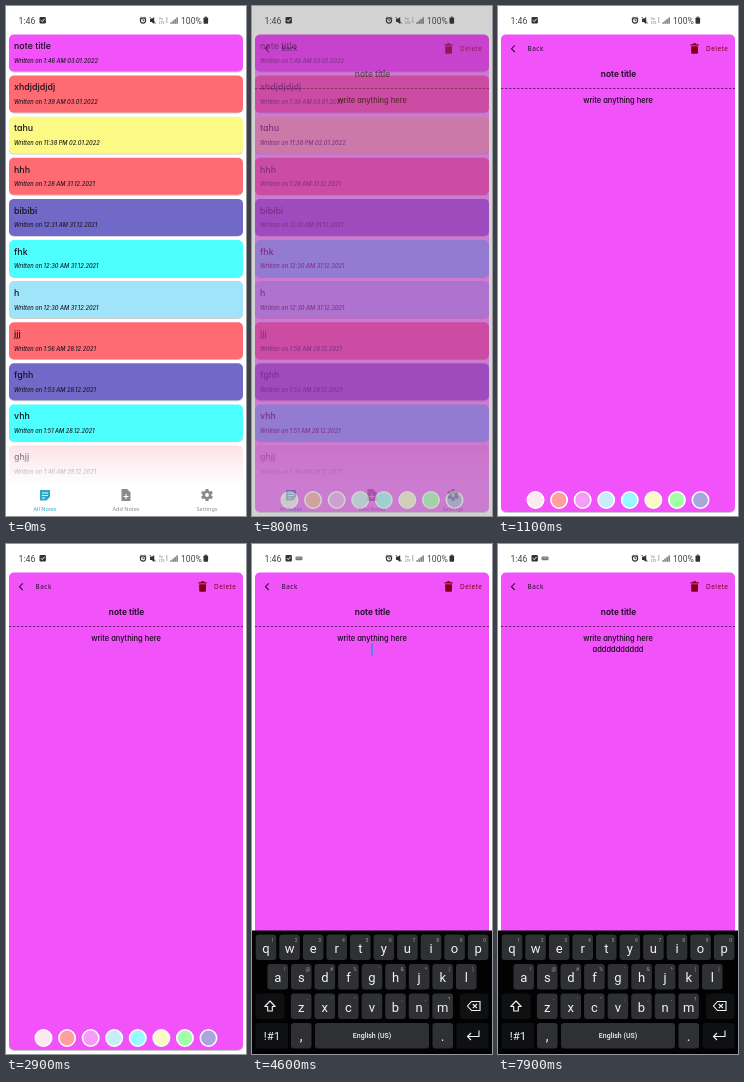
Write an HTML page that moves like this. It is 240x510 px and loops after 8 s.

```html
<!DOCTYPE html>
<html lang="en">
<head>
<meta charset="utf-8">
<title>Notes app</title>
<style>
  html, body { margin: 0; width: 100%; height: 100%; overflow: hidden; background: #fff; }
  svg { display: block; width: 240px; height: 510px; }
  text { font-family: Inter, "Open Sans", sans-serif; font-feature-settings: "cv11"; white-space: pre; }
  .ui { font-family: Roboto, sans-serif; font-feature-settings: normal; }
  .label { font-family: "Noto Sans", "Open Sans", sans-serif; font-feature-settings: normal; }
  .mid { text-anchor: middle; }
</style>
</head>
<body>
<svg id="stage" viewBox="0 0 240 510">
  <defs>
    <linearGradient id="fade" x1="0" y1="0" x2="0" y2="1">
      <stop offset="0" stop-color="#fff" stop-opacity="0"/>
      <stop offset=".2" stop-color="#fff" stop-opacity=".35"/>
      <stop offset="1" stop-color="#fff" stop-opacity=".95"/>
    </linearGradient>
  </defs>
  <g id="list"></g>
  <rect id="scrim" width="240" height="510"/>
  <g id="note"></g>
  <g id="status"></g>
  <g id="keyboard"></g>
</svg>
<script>
const LOOP = 8000;
const MAGENTA = '#f152fa', RED = '#ff6b72', PURPLE = '#7169c8', CYAN = '#4dffff';
const $ = id => document.getElementById(id);

function add(parent, tag, attrs, content) {
  const node = document.createElementNS('http://www.w3.org/2000/svg', tag);
  for (const key in attrs) node.setAttribute(key, attrs[key]);
  if (content !== undefined) node.textContent = content;
  parent.appendChild(node);
  return node;
}
const box = (g, x, y, width, height, fill, rx = 0) =>
  add(g, 'rect', { x, y, width, height, fill, rx });
const write = (g, x, y, size, content, attrs = {}) =>
  add(g, 'text', { x, y, 'font-size': size, ...attrs }, content);
const line = (g, d, stroke, width = 1, attrs = {}) =>
  add(g, 'path', { d, stroke, fill: 'none', 'stroke-width': width, ...attrs });
const fill = (g, d, color) => add(g, 'path', { d, fill: color });
const dot = (g, cx, cy, r, color, attrs = {}) =>
  add(g, 'circle', { cx, cy, r, fill: color, ...attrs });

function drawList(g) {
  const rows = [
    ['note title', '1:46 AM 03.01.2022', MAGENTA],
    ['xhdjdjdjdj', '1:39 AM 03.01.2022', RED],
    ['tahu', '11:38 PM 02.01.2022', '#fdf985'],
    ['hhh', '1:28 AM 31.12.2021', RED],
    ['bibibi', '12:31 AM 31.12.2021', PURPLE],
    ['fhk', '12:30 AM 31.12.2021', CYAN],
    ['h', '12:30 AM 31.12.2021', '#a0e4f9'],
    ['jjj', '1:56 AM 28.12.2021', RED],
    ['fghh', '1:53 AM 28.12.2021', PURPLE],
    ['vhh', '1:51 AM 28.12.2021', CYAN],
    ['ghjj', '1:46 AM 28.12.2021', '#fbd9e2']
  ];
  box(g, 0, 0, 240, 510, '#fff');
  rows.forEach(([title, date, color], i) => {
    const y = 28.5 + i * 41.1;
    box(g, 3, y + 0.9, 234, 37, '#0003', 5);
    box(g, 3, y, 234, 37, color, 5);
    write(g, 8, y + 14.7, 8.9, title, { 'font-weight': 500, fill: '#15121a' });
    write(g, 8, y + 28.4, 5.7, 'Written on ' + date,
      { 'font-weight': 500, 'font-style': 'italic', fill: '#1a1620' });
  });
  add(g, 'rect', { x: 0, y: 436, width: 240, height: 41, fill: 'url(#fade)' });
  box(g, 0, 477, 240, 33, '#fff');

  const blue = '#2ba6c9', grey = '#8a8a8a';
  fill(g, 'M34 484h10v7l-3.5 3.5H34z', blue);
  line(g, 'M36 487h6M36 489.5h6M36 492h3', '#fff', 0.9);
  fill(g, 'M115.500 483h5.500l3.500 3.500v8.500h-9z', grey);
  line(g, 'M117.500 490.500h5M120 488v5', '#fff', 1.1);
  dot(g, 201, 489, 3.2, 'none', { stroke: grey, 'stroke-width': 2.6 });
  for (let a = 0; a < 360; a += 60)
    add(g, 'rect', { x: 199.5, y: 483, width: 3, height: 2.4, fill: grey, transform: `rotate(${a} 201 489)` });
  [['All Notes', 39, blue], ['Add Notes', 120, grey], ['Settings', 201, grey]].forEach(([name, x, color]) =>
    write(g, x, 505, 5.5, name, { class: 'label mid', fill: color }));
}

function drawNote(g) {
  box(g, 0, 0, 240, 510, '#fff');
  box(g, 3, 29, 234, 478, '#0003', 5);
  box(g, 3, 28.5, 234, 477.5, MAGENTA, 5);
  line(g, 'M16.800 39.300L13.500 42.700l3.300 3.400', '#2a1030', 1.1);
  write(g, 29.5, 45, 6.4, 'Back', { class: 'label', fill: '#2a1030', 'letter-spacing': 0.55 });
  fill(g, 'M192.500 38.200h2.200l.7-.9h2.400l.7.900h2.200v1.400h-8.200z M193.200 40.200h6.800v6.400q0 1.200-1.200 1.200h-4.400q-1.200 0-1.200-1.200z', '#7d0012');
  write(g, 208, 45, 6.4, 'Delete', { class: 'label', fill: '#7d0012', 'letter-spacing': 0.5 });
  write(g, 120.5, 71, 8.4, 'note title', { class: 'mid', 'font-weight': 600, fill: '#180a1c' });
  line(g, 'M3 82.500H237', '#6b2472', 1, { 'stroke-dasharray': '2.4 1.6' });
  const body = { class: 'mid', 'font-weight': 500, fill: '#180a1c' };
  write(g, 120, 97.2, 7.5, 'write anything here', body);
  const typed = write(g, 120, 107.5, 7.5, '', body);
  const caret = box(g, 0, 0, 1.5, 12, '#2f8fd0');
  ['#fce8ef', '#ff9f9f', '#f59bf8', '#c6edf9', '#97faff', '#fbf9c4', '#a0ffa8', '#a9a5de'].forEach((color, i) =>
    dot(g, 37.5 + i * 23.57, 494, 8.2, color, { stroke: '#fff', 'stroke-width': 1.6 }));
  return { typed, caret };
}

function drawStatus(g) {
  const ink = '#333';
  write(g, 12.5, 17.6, 8.8, '1:46', { class: 'ui', fill: '#444' });
  box(g, 33.5, 11, 6.4, 6.6, ink, 1);
  line(g, 'M35 14.200l1.300 1.400 2.300-2.800', '#fff', 0.9);
  const badge = add(g, 'g', {});
  box(badge, 43.5, 12.6, 7, 3.6, '#777', 1);
  line(badge, 'M44.500 14h5', '#fff', 0.6, { 'stroke-dasharray': '.8 .6' });
  dot(g, 137, 14.5, 2.6, 'none', { stroke: ink, 'stroke-width': 1.1 });
  line(g, 'M137 13v1.700h1.300M133.700 12.700l1.800-1.600M140.300 12.700l-1.800-1.600', ink, 0.9);
  fill(g, 'M144 13h1.600l2.600-2v7l-2.600-2H144z', ink);
  line(g, 'M143.700 11l6 6.500', ink, 0.9);
  write(g, 152.8, 14, 3.6, 'Vo', { class: 'ui', fill: '#777' });
  write(g, 152.8, 17.6, 3.6, 'LTE', { class: 'ui', fill: '#777' });
  line(g, 'M160.800 11v6', '#888', 0.7);
  for (let i = 0; i < 4; i++) box(g, 164.5 + i * 2, 16.2 - i * 1.6, 1.2, 1.6 + i * 1.6, '#555');
  write(g, 175, 17.6, 8.6, '100%', { class: 'ui', fill: '#444' });
  box(g, 197.5, 11.4, 4.6, 6.4, ink, 0.8);
  box(g, 198.8, 10.6, 2, 1, ink);
  return badge;
}

function drawKeyboard(g) {
  const key = '#2e3033', dark = '#0f1012', ink = '#f2f2f2', pitch = 23.57;
  box(g, 0, 386.5, 240, 124, '#020203');
  const letterRow = (letters, hints, x, y) => [...letters].forEach((letter, i) => {
    const cx = x + i * pitch;
    box(g, cx - 10.3, y, 20.6, 25.5, key, 3);
    write(g, cx, y + 18.3, 13, letter, { class: 'ui mid', fill: ink });
    write(g, cx + 6.6, y + 7.3, 5, hints[i], { class: 'ui mid', fill: '#a0a2a5' });
  });
  letterRow('qwertyuiop', '1234567890', 14, 390.5);
  letterRow('asdfghjkl', '!@#%\'&*()', 25.7, 420);
  letterRow('zxcvbnm', '-\'":;,?', 49.2, 449.5);

  [[3.5, 449.5, 29], [208, 449.5, 28.5], [3.5, 479, 32.5], [204.5, 479, 32]].forEach(([x, y, w]) =>
    box(g, x, y, w, 25.5, dark, 3));
  [[39, 20.5], [63, 114], [180.5, 20.5]].forEach(([x, w]) => box(g, x, 479, w, 25.5, key, 3));

  line(g, 'M18 457l5.200 5.500h-2.900v4.500h-4.600v-4.500h-2.900z', ink, 1.1, { 'stroke-linejoin': 'round' });
  line(g, 'M219.500 457.500h8.500v9h-8.500l-4-4.500zM220.800 460l4.200 4.200M225 460l-4.200 4.200', ink, 1.1);
  line(g, 'M227 486.500v6h-11.500M219 489l-3.500 3.500 3.500 3.500', ink, 1.1);
  write(g, 20, 496, 11.5, '!#1', { class: 'ui mid', fill: ink });
  write(g, 49.2, 497, 14, ',', { class: 'ui mid', fill: ink });
  write(g, 190.7, 497, 14, '.', { class: 'ui mid', fill: ink });
  write(g, 120, 494.3, 7, 'English (US)', { class: 'ui mid', fill: ink, 'font-weight': 500 });
}

drawList($('list'));
const { typed, caret } = drawNote($('note'));
const badge = drawStatus($('status'));
drawKeyboard($('keyboard'));

const FADE = 600, KEYS = 3200, ENTER = 4300, TYPE = 5250, PER_KEY = 225, FULL = 'adddddddddd';
const clamp = v => Math.min(1, Math.max(0, v));
const show = (node, on) => node.setAttribute('visibility', on ? 'visible' : 'hidden');

function render(now) {
  const t = Math.floor(now % LOOP / 100) * 100;

  const fade = clamp((t - FADE) / 400);
  $('note').setAttribute('opacity', fade);
  $('scrim').setAttribute('opacity', 0.35 * clamp(fade * 2));

  const rise = 1 - (1 - clamp((t - KEYS) / 400)) ** 3;
  $('keyboard').setAttribute('transform', `translate(0 ${124 * (1 - rise)})`);
  show($('keyboard'), rise > 0);
  show(badge, t > KEYS);

  const count = t < TYPE ? 0 : Math.min(FULL.length, 1 + Math.floor((t - TYPE) / PER_KEY));
  typed.textContent = FULL.slice(0, count);

  // The caret turns solid again after every key press.
  const lastKey = count ? TYPE + (count - 1) * PER_KEY : t >= ENTER ? ENTER : KEYS;
  const end = t < ENTER ? 156 : 120 + (count ? typed.getComputedTextLength() / 2 : 0);
  caret.setAttribute('x', end - (count ? 0 : 0.7));
  caret.setAttribute('y', t < ENTER ? 89 : 99.5);
  show(caret, t > KEYS && (t - lastKey) % 800 < 400);
}

const start = performance.now();
(function tick() {
  render(performance.now() - start);
  requestAnimationFrame(tick);
})();
</script>
</body>
</html>
```
